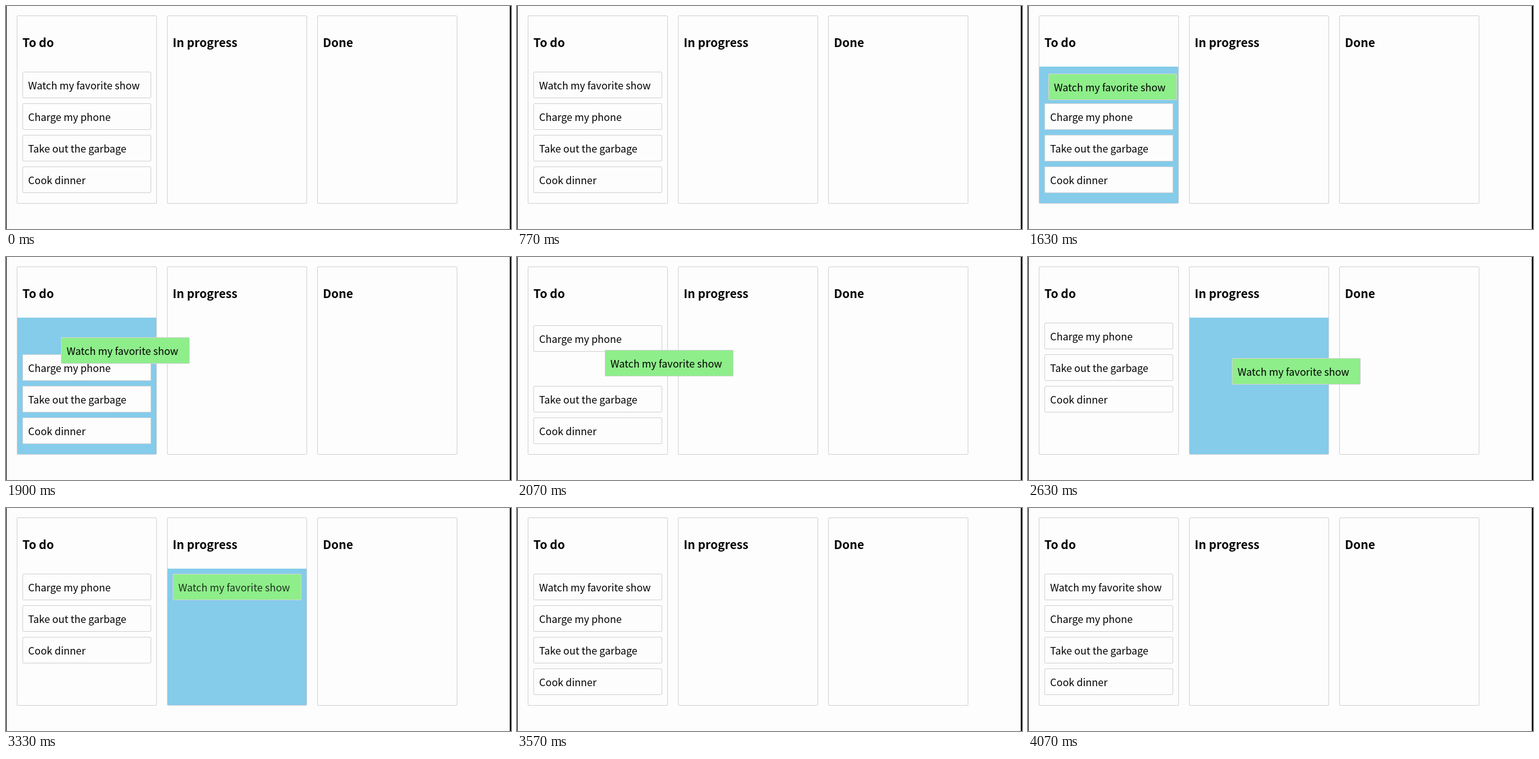
Animation of 800x353 px, one loop 5630 ms. Source, as an HTML page with a canvas:

```html
<!DOCTYPE html>
<html lang="en">
<head>
<meta charset="utf-8">
<title>Task board</title>
<style>
html, body { margin: 0; width: 100%; height: 100%; overflow: hidden; background: #fdfdfd; }
canvas { display: block; }
</style>
</head>
<body>
<canvas id="stage" width="800" height="353"></canvas>
<script>
const ctx = document.getElementById('stage').getContext('2d', { alpha: false });

const LOOP = 5630;
const FONT = '"Noto Sans CJK JP", "Noto Sans CJK SC", "Noto Sans CJK", "Noto Sans", sans-serif';
const COLOR = {
  page: '#fdfdfd', edge: '#111111', line: '#d3d3d6', text: '#000000',
  list: '#84ccea', held: '#8eee8a', dropText: '#1c301c'
};

const COLUMNS = [['To do', 17], ['In progress', 255], ['Done', 493]];
const TASKS = ['Watch my favorite show', 'Charge my phone', 'Take out the garbage', 'Cook dinner'];
const HOME = { x: 26, y: 104 };
const STEP = 50;

// Moments of the drag, in ms
const GRAB = 1630, PASS = 1956, LEAVE = 2066, ENTER = 2105, DROP = 3015, RESET = 3370;
const DROP_TIME = 342, SHIFT_TIME = 200;

// Pointer path: time, dx, dy
const PATH = [[1630, 6, 3], [1850, 48, 18], [2070, 113, 43], [2300, 215, 55], [2630, 297, 56]];

const clamp = v => Math.min(1, Math.max(0, v));

function bezier(x1, y1, x2, y2) {
  const at = (a, b, s) => 3 * a * s * (1 - s) ** 2 + 3 * b * s * s * (1 - s) + s ** 3;
  return x => {
    if (x <= 0 || x >= 1) return clamp(x);
    let lo = 0, hi = 1;
    for (let i = 0; i < 24; i++) {
      const mid = (lo + hi) / 2;
      if (at(x1, x2, mid) < x) lo = mid; else hi = mid;
    }
    return at(y1, y2, lo);
  };
}

const shiftEase = bezier(0.2, 0, 0, 1);
const dropEase = bezier(0.2, 1, 0.1, 1);

// Smooth curve through the pointer path; k selects dx (1) or dy (2)
function follow(t, k) {
  const last = PATH.length - 1;
  if (t >= PATH[last][0]) return PATH[last][k];
  let i = 0;
  while (t >= PATH[i + 1][0]) i++;
  const slope = j => {
    if (j === last) return 0;
    const a = PATH[Math.max(0, j - 1)], b = PATH[j + 1];
    return (b[k] - a[k]) / (b[0] - a[0]);
  };
  const a = PATH[i], b = PATH[i + 1], d = b[0] - a[0], u = (t - a[0]) / d;
  return a[k] * (1 + 2 * u) * (1 - u) ** 2 + slope(i) * d * u * (1 - u) ** 2 +
    b[k] * u * u * (3 - 2 * u) + slope(i + 1) * d * u * u * (u - 1);
}

function heldPosition(t) {
  const x = HOME.x + follow(t, 1), y = HOME.y + follow(t, 2);
  const p = dropEase(clamp((t - DROP) / DROP_TIME));
  return [x + (COLUMNS[1][1] + 9 - x) * p, y + (HOME.y - y) * p];
}

function outline(x, y, w, h) {
  ctx.strokeStyle = COLOR.line;
  ctx.lineWidth = 1;
  ctx.beginPath();
  ctx.roundRect(x + 0.5, y + 0.5, w - 1, h - 1, 1.5);
  ctx.stroke();
}

function drawText(text, x, y, font, color) {
  ctx.font = `${font} ${FONT}`;
  ctx.fillStyle = color;
  ctx.fillText(text, x, y);
}

function drawColumn(title, x, active) {
  if (active) {
    ctx.fillStyle = COLOR.list;
    ctx.fillRect(x + 1, 96, 220, 216);
  }
  outline(x, 15, 222, 298);
  drawText(title, x + 9, 65, 'bold 18.72px', COLOR.text);
}

function drawCard(text, x, y, fill = COLOR.page, ink = COLOR.text) {
  x = Math.round(x);
  y = Math.round(y);
  ctx.fillStyle = fill;
  ctx.beginPath();
  ctx.roundRect(x, y, 204, 42, 2);
  ctx.fill();
  outline(x, y, 204, 42);
  drawText(text, x + 9, y + 28, '16px', ink);
}

function draw(t) {
  const dragging = t >= GRAB && t < RESET;
  const active = !dragging ? -1 : t < LEAVE ? 0 : t >= ENTER ? 1 : -1;

  ctx.fillStyle = COLOR.page;
  ctx.fillRect(0, 0, 800, 353);
  ctx.fillStyle = COLOR.edge;
  ctx.fillRect(0, 0, 1, 353);
  ctx.fillRect(798, 0, 2, 353);

  COLUMNS.forEach(([title, x], i) => drawColumn(title, x, i === active));

  for (let i = 1; i < TASKS.length; i++) {
    const start = i === 1 ? PASS : LEAVE;
    const shift = dragging ? STEP * shiftEase((t - start) / SHIFT_TIME) : 0;
    drawCard(TASKS[i], HOME.x, HOME.y + i * STEP - shift);
  }

  if (dragging) {
    const ink = t >= DROP ? COLOR.dropText : COLOR.text;
    drawCard(TASKS[0], ...heldPosition(t), COLOR.held, ink);
  } else {
    drawCard(TASKS[0], HOME.x, HOME.y);
  }
}

const began = performance.now();
function tick() {
  draw((performance.now() - began) % LOOP);
  requestAnimationFrame(tick);
}
tick();
</script>
</body>
</html>
```
